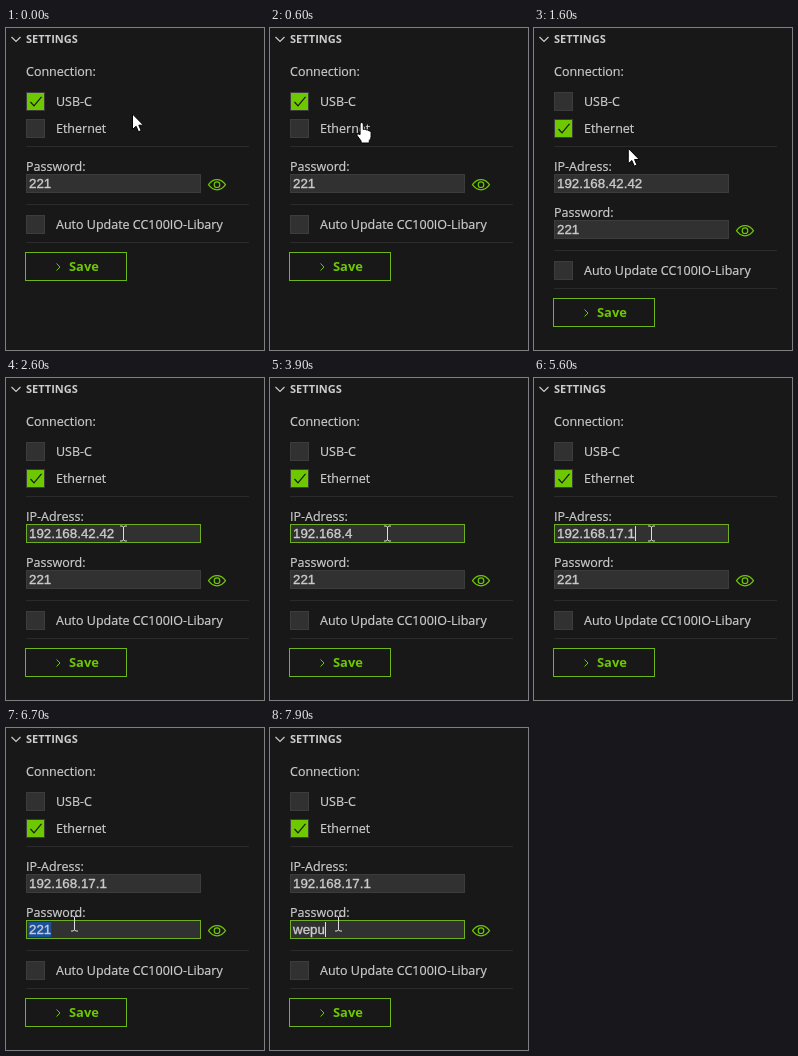
An HTML page that plays this animation: 258x322 px, repeating every 8000 ms.

```html
<!DOCTYPE html>
<html lang="en">
<head>
<meta charset="utf-8">
<title>Settings panel</title>
<style>
  html, body { margin: 0; width: 100%; height: 100%; overflow: hidden; background: #181818; }
  svg { display: block; width: 258px; height: 322px; }
  text { fill: #ccc; stroke: #ccc; stroke-width: .2px; font: 12.5px "Open Sans", "Noto Sans", sans-serif; white-space: pre; }
  .title { font-size: 11px; font-weight: 700; stroke: none; }
  .save { font-size: 12.9px; font-weight: 700; fill: #6ec800; stroke: none; }
  .value { font: 13.333px "Liberation Sans", Arial, sans-serif; stroke-width: .35px; }
  .rule { fill: #2b2b2b; }
  .field, .box { fill: #313131; stroke: #3c3c3c; }
  .box.on { fill: #6ec800; }
  .field.focus { stroke: #6fae20; }
  .line { fill: none; stroke: #6ec800; }
  .frame { fill: none; stroke: #6fb41a; }
  .tick { fill: none; stroke: #181818; stroke-width: 1.2; }
  .pointer { fill: #fff; stroke: #000; stroke-linejoin: round; }
</style>
</head>
<body>
<svg id="stage" viewBox="0 0 258 322">
  <rect width="258" height="322" fill="#181818"/>
  <path d="M5.5 9 L10 13.5 L14.5 9" fill="none" stroke="#ccc" stroke-width="1.2"/>
  <text class="title" x="20" y="15">SETTINGS</text>
  <text x="20" y="48">Connection:</text>
  <g id="usb"></g>
  <g id="ethernet"></g>
  <rect class="rule" x="20" y="118" width="223" height="1"/>
  <g id="ip"></g>
  <g id="lower">
    <g id="password"></g>
    <path class="line" stroke-width="1.2" d="M202.5 156.7 Q206 151.6 211 151.6 T219.5 156.7 Q216 161.8 211 161.8 T202.5 156.7Z"/>
    <circle class="line" stroke-width="1.2" cx="211" cy="156.7" r="2.8"/>
    <rect class="rule" x="20" y="176" width="223" height="1"/>
    <g id="auto"></g>
    <rect class="rule" x="20" y="214" width="223" height="1"/>
    <rect class="frame" x="19.5" y="224.5" width="101" height="28"/>
    <path class="line" d="M50.5 235.5 L54 239 L50.5 242.5"/>
    <text class="save" x="63" y="243">Save</text>
  </g>
  <g id="cursor">
    <path id="arrow" class="pointer" d="M0 0 V15.5 L3.6 12.2 L6 17.8 L8.7 16.6 L6.3 11.2 H11Z"/>
    <path id="hand" class="pointer" d="M-1.6 1.5 Q-1.6 0 0 0 T1.6 1.5 V7 Q4 5.8 4.6 7.6 Q6.6 6.6 7.2 8.4 Q9.4 7.8 9.4 10 V14 Q9.4 16.5 7.6 18 V20.5 H-.6 V18.5 L-4.6 13 Q-5 10.4 -1.6 12Z"/>
    <path id="beam" fill="none" stroke="#ddd" d="M-3 -7.5 H-1 L.5 -6.5 L2 -7.5 H4 M.5 -6.5 V6.5 M-3 7.5 H-1 L.5 6.5 L2 7.5 H4"/>
  </g>
</svg>
<script>
const LOOP = 8000, STEP = 100, GROWN = 46, FIELD_Y = 146;
const $ = id => document.getElementById(id);

function add(parent, tag, attrs, text = "") {
  const el = document.createElementNS("http://www.w3.org/2000/svg", tag);
  for (const key in attrs) el.setAttribute(key, attrs[key]);
  el.textContent = text;
  parent.append(el);
  return el;
}

function checkbox(id, y, label) {
  const g = $(id);
  const box = add(g, "rect", { class: "box", x: 20.5, y: y + .5, width: 18, height: 18 });
  const tick = add(g, "path", { class: "tick", d: `M24.5 ${y + 10} l3.5 3.8 l7.5 -9` });
  add(g, "text", { x: 50, y: y + 14 }, label);
  return on => {
    box.classList.toggle("on", on);
    show(tick, on);
  };
}

function field(id, y, label) {
  const g = $(id);
  add(g, "text", { x: 20, y: y - 3 }, label);
  const box = add(g, "rect", { class: "field", x: 20.5, y: y + .5, width: 174, height: 18 });
  const mark = add(g, "rect", { x: 22.5, y: y + 2, height: 15, fill: "#1a4f9c" });
  const value = add(g, "text", { class: "value", x: 23, y: y + 14 });
  const caret = add(g, "rect", { y: y + 2, width: 1, height: 15, fill: "#ddd" });
  return (text, focus, blink, selected) => {
    value.textContent = text;
    box.classList.toggle("focus", focus);
    const width = value.getComputedTextLength();
    mark.setAttribute("width", width + .5);
    caret.setAttribute("x", Math.round(23 + width));
    show(mark, selected);
    show(caret, focus && blink && !selected);
  };
}

function show(el, on) { el.style.display = on ? "" : "none"; }

const setUsb = checkbox("usb", 64, "USB-C");
const setEthernet = checkbox("ethernet", 91, "Ethernet");
const setAuto = checkbox("auto", 187, "Auto Update CC100IO-Libary");
const setIp = field("ip", FIELD_Y, "IP-Adress:");
const setPassword = field("password", FIELD_Y, "Password:");
setAuto(false);

const clicks = { ethernet: 1000, ip: 2100, password: 6400, select: 6500 };
const erase = [2800, 3000, 3200, 3400, 4000];
const typeIp = [4400, 4700, 5000, 5300];
const typePassword = [6900, 7100, 7300, 7500];
const inputs = [clicks.ip, ...erase, ...typeIp, clicks.password, ...typePassword];

// start, end, from x, from y, to x, to y
const moves = [
  [200, 800, 126.5, 86, 79.5, 97.5],
  [1300, 2000, 79.5, 97.5, 117, 155.5],
  [5700, 6300, 117, 155.5, 68, 195.5]
];

const count = (times, t) => times.filter(at => at <= t).length;

function cursorAt(t) {
  const [start, end, x0, y0, x1, y1] = moves.filter(m => m[0] <= t).pop() || moves[0];
  const p = Math.min(1, Math.max(0, (t - start) / (end - start)));
  const k = p * p * (3 - 2 * p);
  return [x0 + (x1 - x0) * k, y0 + (y1 - y0) * k];
}

function drawCursor(t, wide) {
  const [x, y] = cursorAt(t);
  const inField = top => y >= top && y <= top + 19;
  const beam = wide && (inField(FIELD_Y) || inField(FIELD_Y + GROWN));
  const hand = !beam && x < 99 && y > 91 && y < 110;
  show($("beam"), beam);
  show($("hand"), hand);
  show($("arrow"), !beam && !hand);
  $("cursor").setAttribute("transform", `translate(${x} ${y})`);
}

function draw(t) {
  const wide = t >= clicks.ethernet;
  setUsb(!wide);
  setEthernet(wide);
  show($("ip"), wide);
  $("lower").setAttribute("transform", `translate(0 ${wide ? GROWN : 0})`);

  const last = inputs.filter(at => at <= t).pop() || 0;
  const blink = Math.floor((t - last) / 500) % 2 === 0;
  const ip = "192.168.42.42".slice(0, 13 - count(erase, t)) + "17.1".slice(0, count(typeIp, t));
  const typed = count(typePassword, t);
  const inPassword = t >= clicks.password;
  setIp(ip, t >= clicks.ip && !inPassword, blink, false);
  setPassword(typed ? "wepu".slice(0, typed) : "221", inPassword, blink, t >= clicks.select && !typed);
  drawCursor(t, wide);
}

const begin = performance.now();
function tick(now) {
  const t = Math.max(0, now - begin) % LOOP;
  draw(Math.floor(t / STEP) * STEP);
  requestAnimationFrame(tick);
}
draw(0);
requestAnimationFrame(tick);
</script>
</body>
</html>
```
